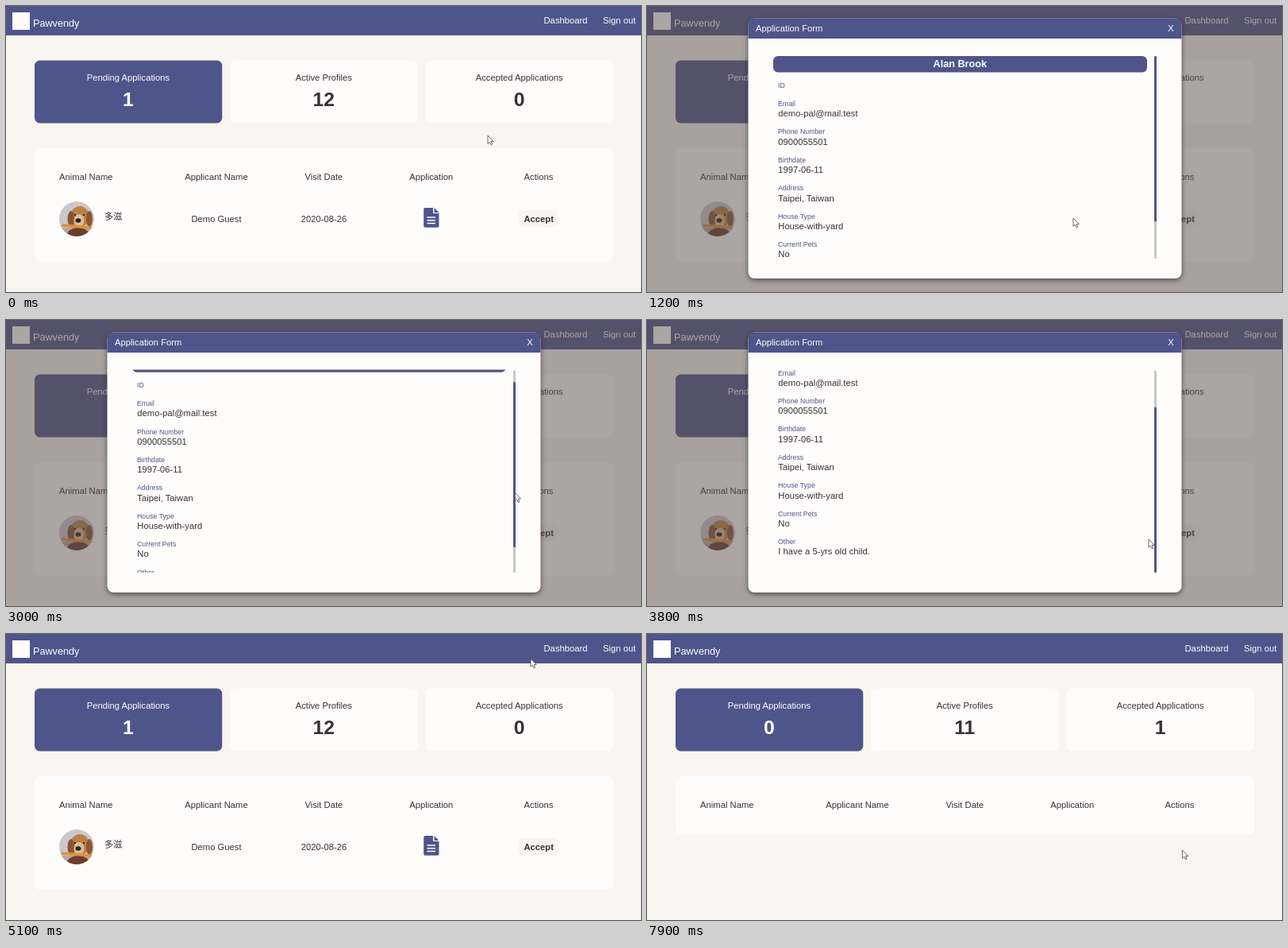
An HTML page that plays this animation: 800x360 px, repeating every 8 s.

```html
<!DOCTYPE html>
<html lang="en">
<head>
<meta charset="utf-8">
<title>Pet adoption dashboard</title>
<style>
  html, body { margin: 0; width: 100%; height: 100%; overflow: hidden; background: #f9f5f0; }
  svg { display: block; font: 11.25px "Liberation Sans", Arial, sans-serif; }
  text { fill: #3a3035; white-space: pre; }
  .mid { text-anchor: middle; }
  .light { fill: #fefdfc; }
  .bold { font-weight: bold; }
  .big { font-size: 24.75px; font-weight: bold; }
  .label { font-size: 8.8px; fill: #4f558a; }
  .blue { fill: #4f558a; }
  .white { fill: #fefdfc; }
  .sand { fill: #f9f5f0; }
  #modal > .sheet { filter: drop-shadow(0 2px 3px rgba(40, 30, 30, .7)); }
</style>
</head>
<body>
<svg id="stage" width="800" height="360" viewBox="0 0 800 360"></svg>
<script>
const LOOP = 8000, OPEN = 1100, CLOSE = 5000, ACCEPT = 7400;

// Cursor path: time, x, y of the tip
const path = [
  [0, 607, 163], [800, 536, 267], [1200, 537, 267], [2300, 641.5, 203],
  [2700, 641.5, 203], [3500, 641, 249], [3800, 632, 276], [4600, 660, 29],
  [5100, 661, 31], [6300, 674, 271.5], [8000, 674.5, 272]
];

const text = (x, y, s, cls = '', more = '') =>
  `<text x="${x}" y="${y}" class="${cls}" ${more}>${s}</text>`;
const box = (x, y, w, h, r, cls, more = '') =>
  `<rect x="${x}" y="${y}" width="${w}" height="${h}" rx="${r}" class="${cls}" ${more}/>`;

const cards = [['Pending Applications', 36], ['Active Profiles', 282.3], ['Accepted Applications', 528.7]]
  .map(([name, x], i) => box(x, 68.5, 236.3, 79, 6.5, i ? 'white' : 'blue') +
    text(x + 118, 94, name, i ? 'mid' : 'mid light') +
    text(x + 118, 126, '', i ? 'mid big count' : 'mid big light count')).join('');

const heads = text(67, 219, 'Animal Name') +
  [['Applicant Name', 265], ['Visit Date', 400.4], ['Application', 535.7], ['Actions', 671]]
    .map(([s, x]) => text(x, 219, s, 'mid')).join('');

const photo = `<g clip-path="url(#round)">
  <rect x="67" y="246" width="44" height="44" fill="#cbc8cc"/>
  <rect x="67" y="279" width="44" height="11" fill="#b9a7a0"/>
  <ellipse cx="91" cy="288" rx="14" ry="9" fill="#6b3d2b"/>
  <ellipse cx="93" cy="265" rx="12" ry="13" fill="#b98145"/>
  <ellipse cx="82" cy="268" rx="4.5" ry="10" fill="#8a5632"/>
  <ellipse cx="105" cy="268" rx="4" ry="10" fill="#8a5632"/>
  <ellipse cx="92" cy="270" rx="6.5" ry="8" fill="#d9bd96"/>
  <ellipse cx="91" cy="270" rx="3.5" ry="2.8" fill="#2a211f"/>
  <path d="M86 263h2M97 263h2" stroke="#2a211f" stroke-width="2"/>
  <path d="M70 276L108 279" stroke="#e0903a" stroke-width="3.5"/>
</g>`;

const sheet = `<path class="blue" d="M528 254h10v6q0 1 1 1h6.5v16q0 1.8-1.8 1.8h-15.7q-1.8 0-1.8-1.8v-21.200q0-1.800 1.800-1.800zM539.500 254l6 6h-6z"/>
  <path d="M530.500 266h10.500M530.500 269.700h10.500M530.500 273.400h10.500" stroke="#fefdfc" stroke-width="1.5"/>`;

const row = box(55, 234, 691.5, 68.500, 5, 'sand', 'id="hover"') + photo +
  text(124, 268.500, '多滋', '', 'style="font-family:\'Noto Sans CJK TC\',\'Noto Sans CJK\',sans-serif;font-weight:300"') +
  text(265, 271.5, 'Demo Guest', 'mid') + text(400.4, 271.5, '2020-08-26', 'mid') + sheet +
  box(646, 257, 50.500, 21.500, 6, '', 'id="button"') +
  text(671.2, 271.5, 'Accept', 'mid bold', 'id="accept"');

const fields = [
  ['Email', 'demo-pal@mail.test'], ['Phone Number', '0900055501'], ['Birthdate', '1997-06-11'],
  ['Address', 'Taipei, Taiwan'], ['House Type', 'House-with-yard'], ['Current Pets', 'No'],
  ['Other', 'I have a 5-yrs old child.']
].map(([name, value], i) => text(165, 126 + i * 35.4, name, 'label') +
  text(165.3, 139.3 + i * 35.4, value)).join('');

const modal = `<rect width="800" height="360" fill="rgba(90,78,78,.5)"/>
  ${box(127.5, 15.5, 546, 327.5, 8, 'white sheet')}
  <path class="blue" d="M127.5 41v-17.500q0-8 8-8h530q8 0 8 8v17.500z"/>
  ${text(137, 32, 'Application Form', 'light')}${text(656.3, 32, 'X', 'light')}
  <g clip-path="url(#view)"><g id="content">
    ${box(159, 63, 471, 20.5, 6, 'blue')}
    ${text(394.3, 77.3, 'Alan Brook', 'mid light bold', 'style="font-size:12.66px"')}
    ${text(165, 103, 'ID', 'label')}${fields}
  </g></g>
  ${box(639, 63, 3, 255, 1.5, '', 'fill="#c9c7c6"')}
  ${box(639, 63, 3, 208.5, 1.5, 'blue', 'id="thumb"')}`;

const $ = id => document.getElementById(id);
$('stage').innerHTML = `<defs>
    <clipPath id="round"><circle cx="89" cy="268" r="22"/></clipPath>
    <clipPath id="view"><rect x="155" y="62.5" width="480" height="255.5"/></clipPath>
  </defs>
  <rect width="800" height="360" class="sand"/>
  <rect width="800" height="37" class="blue"/>
  <rect x="8" y="8" width="22" height="22" class="white"/>
  ${text(34, 26, 'Pawvendy', 'light', 'style="font-size:12.66px"')}
  ${text(677.5, 22, 'Dashboard', 'light')}${text(752, 22, 'Sign out', 'light')}
  ${cards}${box(36, 179, 729, 142.5, 7, 'white', 'id="panel"')}${heads}
  <g id="row">${row}</g><g id="modal">${modal}</g>
  <g id="cursor" fill="#fff" stroke="#444" stroke-width=".8" stroke-linejoin="round">
    <path id="arrow" d="M0 0V10.300L2.300 8.200L4 11.800L5.700 11L4.100 7.500H7.200Z"/>
    <path id="hand" d="M-1 1q1-1.400 2 0v4l3.500.8q1.500.5 1.300 2l-.7 3.200-.8 2.500h-5l-3-4.500q-.5-1.500 1-1.200l1.700 1.500z"/>
  </g>`;

const counts = document.querySelectorAll('.count');
const show = (id, on) => $(id).style.display = on ? '' : 'none';

function cursorAt(t) {
  const i = path.findIndex(p => p[0] > t);
  const [t0, x0, y0] = path[i - 1], [t1, x1, y1] = path[i];
  const u = (t - t0) / (t1 - t0), e = u * u * (3 - 2 * u);
  return [x0 + (x1 - x0) * e, y0 + (y1 - y0) * e];
}

function draw(t) {
  const [x, y] = cursorAt(t);
  const within = (l, top, r, b) => x > l && x < r && y > top && y < b;
  const open = t >= OPEN && t < CLOSE, done = t >= ACCEPT;
  const free = !open && !done;
  const onButton = free && within(646, 257, 697, 279);
  const onSheet = free && within(526, 254, 546, 279);
  const onClose = open && within(655, 20, 665, 36);

  [done ? 0 : 1, done ? 11 : 12, done ? 1 : 0].forEach((n, i) => counts[i].textContent = n);
  $('panel').setAttribute('height', done ? 73 : 142.5);
  show('row', !done);
  show('hover', free && within(55, 234, 746, 303));
  $('button').setAttribute('class', onButton ? 'blue' : 'sand');
  $('accept').setAttribute('class', onButton ? 'mid bold light' : 'mid bold');

  show('modal', open);
  const u = Math.min(1, Math.max(0, (t - 2700) / 800)), scroll = u * u * (3 - 2 * u);
  $('content').setAttribute('transform', `translate(0 ${-56.3 * scroll})`);
  $('thumb').setAttribute('y', 63 + 46.5 * scroll);

  const hand = onButton || onSheet || onClose;
  show('hand', hand);
  show('arrow', !hand);
  $('cursor').setAttribute('transform', `translate(${x} ${y})`);
}

const start = performance.now();
function tick() {
  const t = (performance.now() - start) % LOOP;
  draw(Math.floor(t / 100) * 100);
  requestAnimationFrame(tick);
}
tick();
</script>
</body>
</html>
```
